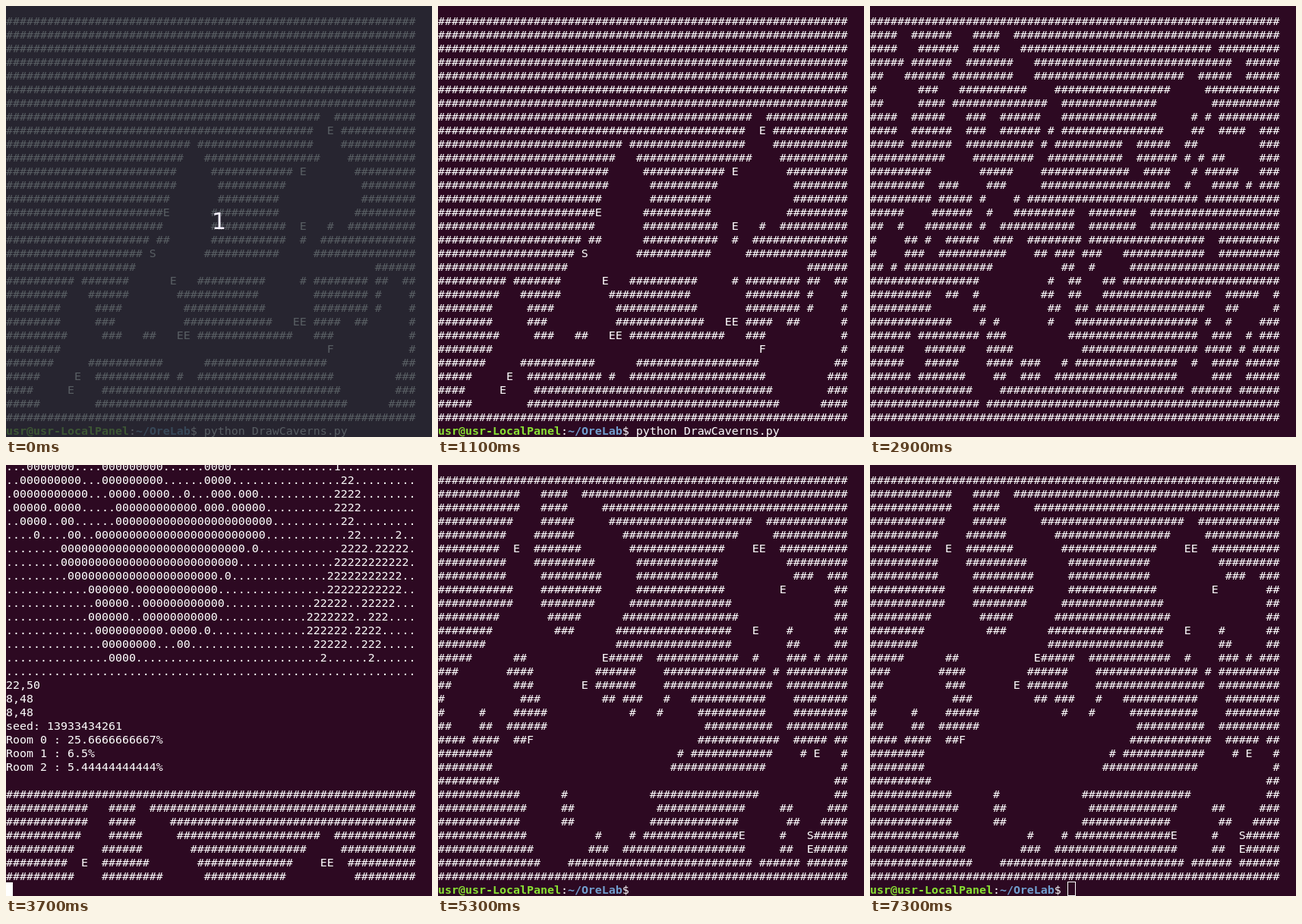
Animation, 561 px wide and 568 px high, one loop 7400 ms. Source, as an HTML page:

```html
<!DOCTYPE html>
<html lang="en">
<head>
<meta charset="utf-8">
<title>Cave generator</title>
<style>
  html, body { margin: 0; width: 100%; height: 100%; overflow: hidden; background: #2d0922; }
  #stage { position: absolute; left: 0; top: 0; width: 561px; height: 568px; overflow: hidden; }
  pre {
    position: absolute; left: 0; margin: 0; color: #fff; white-space: pre;
    /* gives a 9px cell */
    font: 14.949px/18px "DejaVu Sans Mono", monospace;
    font-variant-ligatures: none;
  }
  #screen { top: -7px; }
  #prompt { top: 551px; }
  #prompt b:first-child { color: #8ae234; }
  #prompt b { color: #729fcf; }
  #cursor { position: absolute; top: 550px; width: 9px; height: 18px; background: #fff; }
  #cursor.hollow {
    margin: -1px; width: 11px; height: 19px; box-sizing: border-box;
    background: none; border: 1px solid #fff;
  }
  #veil { position: absolute; inset: 0; background: rgba(38, 46, 52, .77); }
  #veil span {
    position: absolute; left: 0; width: 100%; top: 266px; text-align: center;
    font: 30px/36px "DejaVu Sans", sans-serif; color: #f4efff;
  }
</style>
</head>
<body>
<div id="stage">
  <pre id="screen"></pre>
  <pre id="prompt"><b>usr@usr-LocalPanel</b>:<b>~/OreLab</b>$ <span id="cmd">python DrawCaverns.py</span></pre>
  <div id="cursor"></div>
  <div id="veil"><span>1</span></div>
</div>
<script>
const COLS = 60, ROWS = 30, CELL = 9, LOOP = 7400;
const WALL = '#'.repeat(COLS);

// Rows are filled with wall on the right, and solid rows are added above and below.
function cave(text) {
  const rows = text.split('\n').filter(Boolean).map(r => r.padEnd(COLS, '#'));
  while (rows.length < ROWS - 1) rows.unshift(WALL);
  return [...rows, WALL];
}

const oldMap = cave(`
##############################################  #
#############################################  E #
########################### #################    #
##########################   #################    #
#########################     ############ E       #
#########################      ##########           #
########################       #########            #
#######################E      ##########           #
#######################       ###########  E   #  #
##################### ##      ###########  #  #
#################### S       ###########     #
###################                                   #
########## #######      E   ##########     # ######## ##  #
#########   ######       ############        ######## #    #
########     ####         ############       ######## #    #
########     ###          #############   EE ####  ##      #
#########     ###   ##   EE ##############   ###           #
########                                       F           #
#######     ###########      ##################           #
#####     E  ########### #  ####################         #
####     E    ###################################        #
#####        #####################################      #
`);

const noise = cave(`
####  ######   ####  ### ##  # ####  ##### ###   #
####   ## # #  ####   ######  ######  ####  #### # ##### #
##### # ####  ##### #   ##### #### ##############   #  #
##   ###### #########   ### ## ### ###   #####  #####  ### #
#      ###    ## ##  ##    #   ## ####### ##     ######## #
##     #### ### ##########  ## ###########        # #
####  #####   ###   #####   ##  #### # ###   # # # ###### #
## #  ######  ###  ###### # ###############    ##  ####  #
### # # ####  ########## # ######## #  ### #  ##         #
#### #### #    ###### ##  # # #######  #### # # # ##  #  #
#########     # #####    ## ##### # ##  ####   # #####   # #
## ####   ###    ###     ### ##### #### ####  #   #### # #
# #  ####  #### #    # #########  # ######## ### ###### #
## ##    ###  #  #   #### ####  #### ##  ########  #
##  #   ######  #  ###########  ##### #  ###### #
#    ## #   ####  ###  ######## ## # ############  #### #
#    # #  ##########    ## ### ###   ############  ##### # #
## # ### ####### #  #       ##  #     ###### # #
# # ## #####  ##       #  #  ##   ## ## ### ####### #
##### ###  ##  #   #  #  ##  ##   ################  # ###  #
#### ## #      ##  #   #  ##  ## ###### ### #####   ##     #
## #### ####    # #  # #  #   #### ####### ####  #  #    # #
###### ###  #### # #     # # ###################  ###  # #
#####   ### ##   ####          ##### ##### ##### #### # #
## ##   #####  # #### ###   # # ####### ### #  #  # ## #
###### #######  # ##  ###  # ### ##### ######     ###  #
############ ##     # ##########  ##### ###### ###### # #
##  ## ######### ############# ######## # ########## #### #
`);

const smooth = cave(`
####  ######   ####  #
####   ######  ####   ############################ #
##### ######  #######   #############################  #
##   ###### #########   ######################  #####  #
#      ###   ##########    #################     #
##     #### ##############  ##############        #
####  #####   ###  ######   ##############     # # #
####  ######  ###  ###### # ###############    ##  ####  #
##### ######  ########## # ##########  #####  ##         #
###########    #########  ###########  ###### # # ##     #
#########       #####    #############  ####   # #####   #
########  ###    ###     ###################  #   #### # #
######### ##### #    # ######################### #
#####    ######  #   #########  #######  #
##  #   ####### #  ###########  #######  #
#    ## #  #####  ###  ######## #################  #
#    ###  ##########    ## ### ###   ############  #
## # #############          ##  #     #
################          #  ##   ## #
#########  ##  #         ##  ##   ################  #####  #
#########      ##         ##  ## ################   ##     #
############    # #       #   ################## #  #    #
###### ######### ###         ###################  ###  # #
#####   ######   ####          ################# #### # #
#####   #####    #### ###   # ###############  #  #### #
###### #######    ##  ###  ##################     ###  #
###############    ########################### ###### #
################ #
`);

const dungeon = cave(`
############   ####  #
############   ####     #
###########    #####     #####################  #
##########    ######       #################     #
#########  E  #######       ##############    EE  #
##########    #########      ############          #
##########     #########     ############           ###  #
###########    #########     #############        E       #
###########    ########     ###############               #
#########       #####      #################              #
########         ###      #################   E    #      #
#######                   #################        ##     #
#####      ##           E#####  ############  #    ### # #
###       ####         ######    ############### # #
##         ###       E ######    ################  #
#           ###         ## ###   #   ###########    #
#     #    #####            #   #     ##########    #
##    ##  ######                       ##########  #
#### ####  ##F                        ############  ##### #
########                           # ############    # E   #
########                          ##############           #
#########                                                 #
############      #            ################           #
#############     ##            #############     ##     #
############      ##           #############       ##   #
#############          #    # ##############E     #   S#
##############        ###  ##################     ##  E#
###############    ########################### ###### #
`);

const mapCells = (rows, fn) => rows.map((r, y) => [...r].map((c, x) => fn(c, x, y)).join(''));

// Halfway smoothing: a few lower cells still wait for the second pass.
const halfway = mapCells(smooth, (c, x, y) =>
  y > 6 && x < 55 && (x * 5 + y * 3) % 7 === 0 ? noise[y][x] : c);

const bare = mapCells(dungeon, c => 'FS'.includes(c) ? ' ' : c);

// Room numbers, before the corridor on row 22 was dug.
const rooms = mapCells(dungeon, (c, x, y) => {
  const dug = y === 22 && x > 30 && x < 47 && x !== 32;
  const lone = (y === 14 && x === 50) || (y === 16 && x === 19);
  if (c === '#' || dug || lone) return '.';
  return y === 14 && x === 48 ? '1' : x < 43 ? '0' : '2';
});

const log = [
  ...rooms.slice(14),
  '22,50', '8,48', '8,48', 'seed: 13933434261',
  'Room 0 : 25.6666666667%', 'Room 1 : 6.5%', 'Room 2 : 5.44444444444%', '',
  ...dungeon.slice(0, 7)
];

const page = rows => ['', ...rows].join('\n');
const [OLD, NOISE, HALF, SMOOTH, BARE, DONE] =
  [oldMap, noise, halfway, smooth, bare, dungeon].map(page);
const LOG = log.join('\n');

// Each step: start time, then what changes from the step before.
const steps = [
  [0, { text: OLD, prompt: true, cmd: true, cursor: null, veil: true, hollow: false }],
  [400, { cursor: 51, veil: false }],
  [1100, { cursor: null }],
  [1200, { text: NOISE, prompt: false, cmd: false, cursor: 0 }],
  [1700, { cursor: null }],
  [2000, { text: HALF }],
  [2300, { cursor: 0 }],
  [2800, { text: SMOOTH }],
  [2900, { cursor: null }],
  [3700, { text: LOG, cursor: 0 }],
  [4000, { text: BARE }],
  [4100, { cursor: null }],
  [4600, { text: DONE }],
  [4700, { cursor: 0 }],
  [5300, { prompt: true, cursor: null }],
  [5900, { cursor: 29 }],
  [6600, { cursor: null }],
  [7100, { cursor: 29 }],
  [7300, { hollow: true }]
];
let state = {};
const scenes = steps.map(([time, change]) => ({ time, ...(state = { ...state, ...change }) }));

const [screenEl, promptEl, cmdEl, cursorEl, veilEl] =
  ['screen', 'prompt', 'cmd', 'cursor', 'veil'].map(id => document.getElementById(id));
const show = (el, on) => { el.style.display = on ? '' : 'none'; };
let shown = null;

function draw(scene) {
  if (screenEl.textContent !== scene.text) screenEl.textContent = scene.text;
  show(promptEl, scene.prompt);
  show(cmdEl, scene.cmd);
  show(veilEl, scene.veil);
  show(cursorEl, scene.cursor !== null);
  cursorEl.style.left = (scene.cursor || 0) * CELL + 'px';
  cursorEl.className = scene.hollow ? 'hollow' : '';
}

const start = performance.now();
function tick() {
  const t = (performance.now() - start) % LOOP;
  const scene = scenes.filter(s => s.time <= t).pop();
  if (scene !== shown) draw(shown = scene);
  requestAnimationFrame(tick);
}
tick();
</script>
</body>
</html>
```
